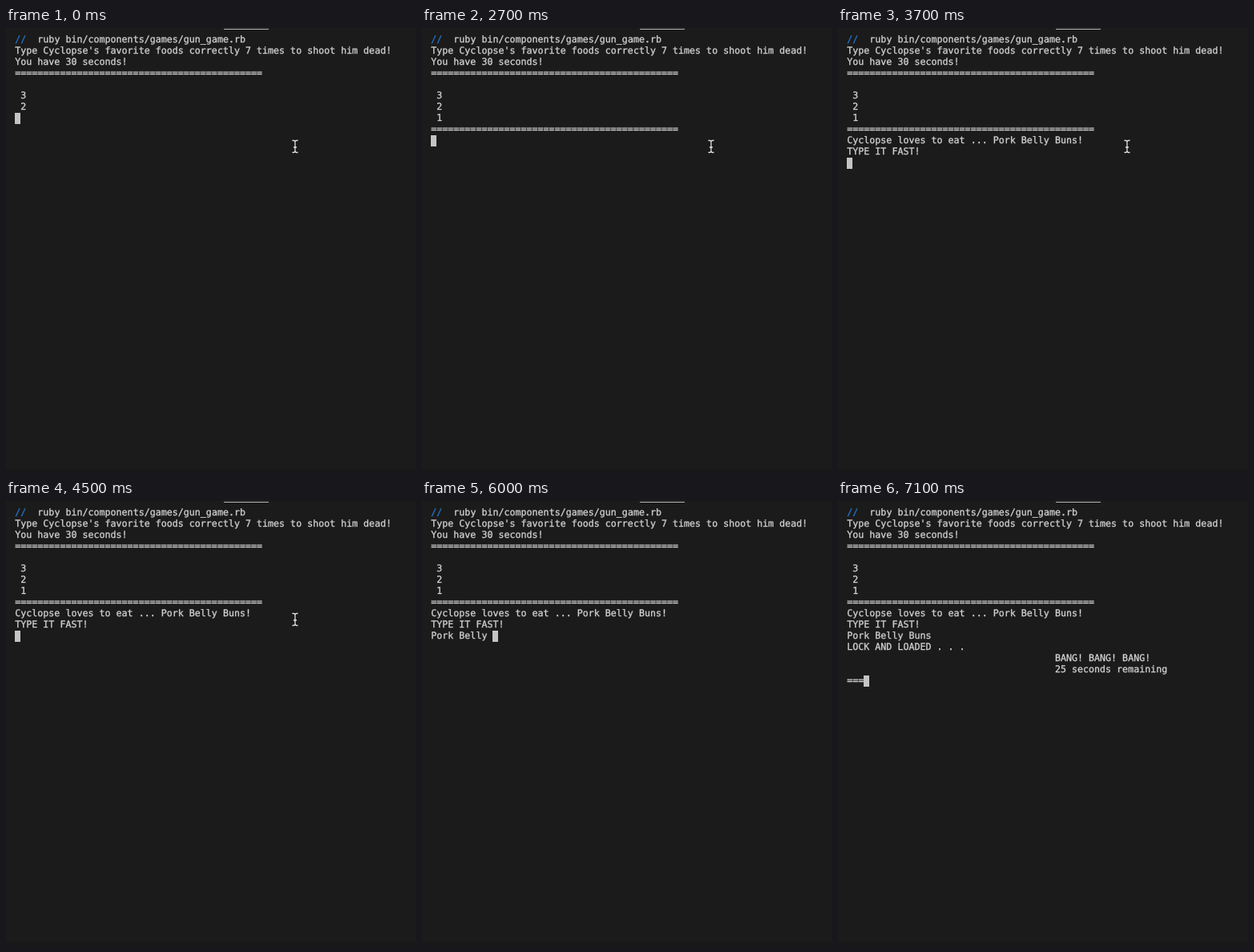
Animation of 512 by 556 pixels, one loop 7200 ms. Source, as an HTML page:

```html
<!DOCTYPE html>
<html lang="en">
<head>
<meta charset="utf-8">
<title>Typing game</title>
<style>
  html, body { margin: 0; width: 100%; height: 100%; overflow: hidden; background: #1b1b1b; }
  #stage { position: relative; width: 512px; height: 556px; overflow: hidden; }
  #stage > * { position: absolute; }
  #screen {
    left: 11.25px; top: 7px; margin: 0; color: #d2d2d2;
    font: 11.66px/14px "DejaVu Sans Mono", monospace;
    font-variant-ligatures: none;
    text-rendering: geometricPrecision;
    -webkit-text-stroke: 0.3px;
  }
  #screen b { font-weight: normal; color: #2873c4; }
  #caret { left: 11px; top: 8px; width: 7px; height: 14px; background: #c4c4c4; }
  #tab { left: 272px; top: 1px; width: 56px; height: 1px; background: #b4b4b4; }
  #foot { left: 0; top: 551px; width: 512px; height: 5px; background: #181818; }
  #mouse { left: 355px; top: 139px; fill: none; }
</style>
</head>
<body>
<div id="stage">
  <div id="tab"></div>
  <div id="foot"></div>
  <div id="caret"></div>
  <pre id="screen"><b>//</b>  ruby bin/components/games/gun_game.rb
<span id="out"></span></pre>
  <svg id="mouse" width="12" height="18">
    <defs>
      <path id="beam" d="M2.5 1.5H4Q6 1.5 6 3.5Q6 1.5 8 1.5H9.5M6 3V15M2.5 16.5H4Q6 16.5 6 14.5Q6 16.5 8 16.5H9.5M4 10H8"/>
    </defs>
    <use href="#beam" stroke="#111" stroke-width="2.6"/>
    <use href="#beam" stroke="#e6e6e6" stroke-width="1.3"/>
  </svg>
</div>
<script>
const LOOP = 7200, STEP = 100, CELL = 7.02, LINE = 14;
const TYPING = 4600;
const rule = "=".repeat(44);
const pad = " ".repeat(37);

// Each entry prints its text from `at`, one character per `per` ms (or all at once).
const script = [
  { at: 0, text: "Type Cyclopse's favorite foods correctly 7 times to shoot him dead!\n" +
      "You have 30 seconds!\n" + rule + "\n\n 3\n 2\n" },
  { at: 400, text: " 1\n" },
  { at: 1400, per: 20, text: rule + "\n" },
  { at: 3300, text: "Cyclopse loves to eat ... Pork Belly Buns!\nTYPE IT FAST!\n" },
  { at: TYPING - 120, per: 120, text: "Pork " },
  { at: 5200, per: 130, text: "Belly " },
  { at: 6000, per: 100, text: "Buns" },
  { at: 6500, text: "\nLOCK AND LOADED . . .\n" },
  { at: 7000, text: pad + "BANG! BANG! BANG!\n" + pad + "25 seconds remaining\n" },
  { at: 7040, per: 20, text: rule }
];

const out = document.getElementById("out");
const caret = document.getElementById("caret");
const mouse = document.getElementById("mouse");

function printed({ at, per, text }, t) {
  if (t < at) return "";
  return per ? text.slice(0, Math.floor((t - at) / per)) : text;
}

let last = -1;
function draw(now) {
  const t = Math.floor((now % LOOP) / STEP) * STEP;
  if (t !== last) {
    last = t;
    const text = script.map(part => printed(part, t)).join("");
    const lines = text.split("\n");
    const col = lines[lines.length - 1].length;
    out.textContent = text;
    caret.style.transform = `translate(${Math.round(col * CELL)}px, ${lines.length * LINE}px)`;
    mouse.style.visibility = t < TYPING ? "visible" : "hidden";
  }
  requestAnimationFrame(() => draw(performance.now() - start));
}

const start = performance.now();
draw(0);
</script>
</body>
</html>
```
